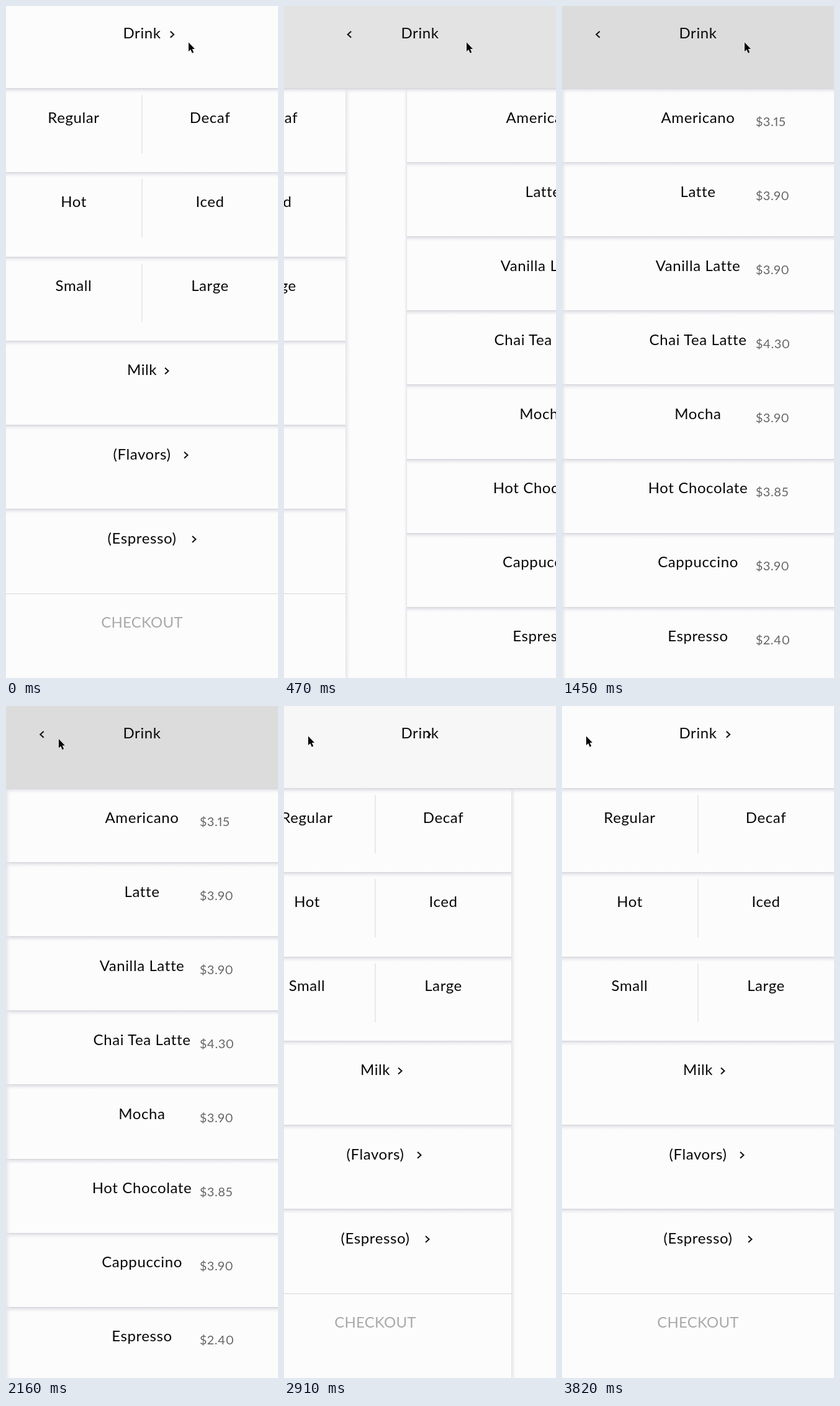
An HTML page that plays this animation: 438 by 1080 pixels, repeating every 3.85 s.

```html
<!DOCTYPE html>
<html lang="en">
<head>
<meta charset="utf-8">
<title>Coffee order menu</title>
<style>
  html, body { margin: 0; width: 100%; height: 100%; overflow: hidden; background: #fcfcfc; }
  svg { display: block; width: 100vw; height: 100vh; }
  text { font: 400 24px Lato, "Open Sans", sans-serif; letter-spacing: .6px; fill: #080808; text-anchor: middle; }
  .price { font-size: 20px; font-variant-numeric: proportional-nums; fill: #666; text-anchor: start; }
  .off { letter-spacing: .2px; fill: #a9a9a9; }
  .panel { fill: #fcfcfc; }
  .line { fill: #d6d6d8; }
  .chevron { fill: none; stroke: #101010; stroke-width: 2; }
</style>
</head>
<body>
<svg viewBox="0 0 438 1080">
  <defs>
    <linearGradient id="down" x2="0" y2="1">
      <stop stop-color="#d8d8e0" stop-opacity=".85"/>
      <stop offset=".45" stop-color="#e6e6ec" stop-opacity=".5"/>
      <stop offset="1" stop-color="#f4f4f6" stop-opacity="0"/>
    </linearGradient>
    <linearGradient id="right">
      <stop stop-color="#dedee5" stop-opacity=".85"/>
      <stop offset="1" stop-color="#f4f4f6" stop-opacity="0"/>
    </linearGradient>
    <linearGradient id="left" x1="1" x2="0">
      <stop stop-color="#dedee5" stop-opacity=".85"/>
      <stop offset="1" stop-color="#f4f4f6" stop-opacity="0"/>
    </linearGradient>
  </defs>
  <g id="list"></g>
  <g id="main"></g>
  <g id="header">
    <rect id="bar" width="438" height="132"/>
    <rect y="133" width="438" height="8" fill="url(#down)"/>
    <rect class="line" y="132" width="438" height="1"/>
    <text x="219" y="52.4">Drink</text>
    <path id="arrow" class="chevron" d="M-3-5L2.5 0L-3 5"/>
  </g>
  <path id="cursor" d="M0 0V14.5L3.3 11.4L5.8 17.2L8.2 16.1L5.8 10.5H10Z"
        fill="#050505" stroke="#fff" stroke-width="1" paint-order="stroke"/>
</svg>
<script>
const W = 438, H = 1080, TOP = 132, LOOP = 3850;
const SLIDE = 480, OPEN = 149, CLOSE = 2566;
const $ = id => document.getElementById(id);

const rect = (x, y, w, h, extra) => `<rect x="${x}" y="${y}" width="${w}" height="${h}" ${extra}/>`;
const label = (x, y, s, cls = '') => `<text x="${x}" y="${y}" class="${cls}">${s}</text>`;
const chevron = (x, y) => `<path class="chevron" d="M-3-5L2.5 0L-3 5" transform="translate(${x} ${y})"/>`;
const rule = (y, shadow = true) =>
  (shadow ? rect(0, y + 1, W, 8, 'fill="url(#down)"') : '') + rect(0, y, W, 1, 'class="line"');
const panel = () => rect(0, TOP, W, H - TOP, 'class="panel"');

function buildMain() {
  const rows = [
    ['Regular', 'Decaf'], ['Hot', 'Iced'], ['Small', 'Large'],
    ['Milk', 259], ['(Flavors)', 290], ['(Espresso)', 303], ['CHECKOUT']
  ];
  let out = panel() + rect(W, TOP, 8, H - TOP, 'fill="url(#right)"');
  rows.forEach(([name, other], i) => {
    const y = TOP + 135.25 * i, base = y + 55.6, last = i === rows.length - 1;
    if (i) out += rule(Math.round(y), !last);
    if (typeof other === 'string') {
      out += label(109, base, name) + label(328.5, base, other);
      out += rect(218.5, Math.round(y) + 11, 1, 94, 'class="line"');
    } else {
      out += label(219, base, name, last ? 'off' : '');
      if (other) out += chevron(other, base - 0.8 - 0.25 * 24);
    }
  });
  $('main').innerHTML = out;
}

function buildList() {
  const drinks = [
    ['Americano', '3.15'], ['Latte', '3.90'], ['Vanilla Latte', '3.90'], ['Chai Tea Latte', '4.30'],
    ['Mocha', '3.90'], ['Hot Chocolate', '3.85'], ['Cappuccino', '3.90'], ['Espresso', '2.40']
  ];
  let out = panel() + rect(-5, TOP, 5, H - TOP, 'fill="url(#left)"');
  drinks.forEach(([name, price], i) => {
    const y = TOP + 119.1 * i;
    if (i) out += rule(Math.round(y));
    out += label(219, y + 55.6, name) + label(312, y + 60.6, '$' + price, 'price');
  });
  $('list').innerHTML = out;
}

const clamp = v => Math.min(1, Math.max(0, v));
const mix = (a, b, k) => a + (b - a) * k;

// cubic-bezier(.42, 0, .58, 1)
function easeInOut(t) {
  let lo = 0, hi = 1, s = .5;
  for (let i = 0; i < 24; i++) {
    s = (lo + hi) / 2;
    const x = 1.26 * s * (1 - s) ** 2 + 1.74 * s * s * (1 - s) + s ** 3;
    if (x < t) lo = s; else hi = s;
  }
  return s * s * (3 - 2 * s);
}

const quad = t => t < .5 ? 2 * t * t : 1 - 2 * (1 - t) ** 2;

function draw(time) {
  const closing = time >= CLOSE;
  const step = clamp((time - (closing ? CLOSE : OPEN)) / SLIDE);
  const moved = step === 0 || step === 1 ? step : easeInOut(step);
  const open = closing ? 1 - moved : moved;
  const shade = Math.round(mix(252, 220, open));

  $('main').setAttribute('transform', `translate(${-W * open} 0)`);
  $('list').setAttribute('transform', `translate(${2 * W * (1 - open)} 0)`);
  $('bar').setAttribute('fill', `rgb(${shade}, ${shade}, ${shade})`);

  // The arrow turns over early in the slide.
  const turn = 1 - 2 * clamp(step / .45);
  $('arrow').setAttribute('transform',
    `translate(${mix(267.7, 57.7, open)} 45.7) scale(${closing ? -turn : turn} 1)`);

  const k = quad(clamp((time - 1860) / 430));
  $('cursor').setAttribute('transform', `translate(${mix(294, 39, k)} ${mix(58.5, 48.5, k ** 3)})`);
}

buildMain();
buildList();
const start = performance.now();
function tick() {
  draw((performance.now() - start) % LOOP);
  requestAnimationFrame(tick);
}
tick();
</script>
</body>
</html>
```
